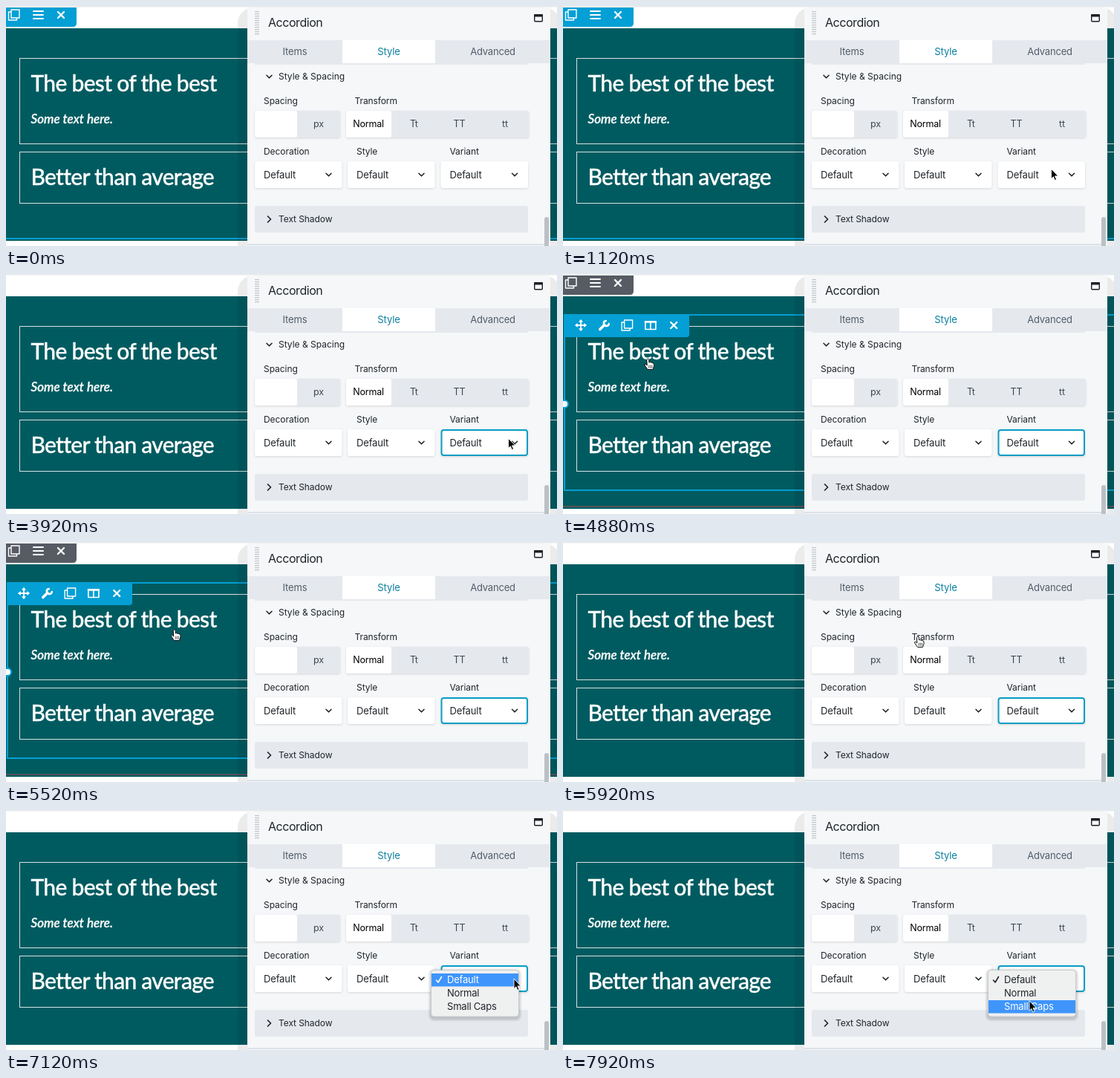
Animation of 742x323 px, one loop 8000 ms. Source, as an HTML page:

```html
<!DOCTYPE html>
<html lang="en">
<head>
<meta charset="utf-8">
<title>Accordion settings</title>
<style>
html, body { margin: 0; width: 100%; height: 100%; overflow: hidden; background: #fff; }
svg { display: block; width: 742px; height: 323px; }
text { font: 12px Inter, "Open Sans", sans-serif; fill: #1f2429; white-space: pre; }
.title { font: 500 30px Lato, sans-serif; fill: #fff; stroke: #fff; stroke-width: .35px; }
.body { font: italic 500 17px Lato, sans-serif; fill: #fff; stroke: #fff; stroke-width: .4px; }
.mid { text-anchor: middle; }
.line { fill: none; stroke-linecap: round; stroke-linejoin: round; }
.field { filter: drop-shadow(0 1px 1.5px rgba(0, 0, 0, .13)); }
</style>
</head>
<body>
<svg id="stage" viewBox="0 0 742 323" xmlns="http://www.w3.org/2000/svg"></svg>
<script>
const NS = "http://www.w3.org/2000/svg";
const stage = document.getElementById("stage");
const LOOP = 8000, STEP = 80;
const BLUE = "#049fd4", TEAL = "#005b60", GREY = "#e5e9ee", INK = "#1f2429";
const TAB = "#525c69", UNIT = "#3d4650";

function add(parent, tag, attrs, content) {
  const el = document.createElementNS(NS, tag);
  for (const k in attrs) el.setAttribute(k, attrs[k]);
  if (content) el.textContent = content;
  parent.appendChild(el);
  return el;
}
const group = (parent, attrs) => add(parent, "g", attrs);
const rect = (p, x, y, width, height, fill, more) =>
  add(p, "rect", { x, y, width, height, fill, ...more });
const path = (p, d, stroke, width, more) =>
  add(p, "path", { d, stroke, "stroke-width": width, class: "line", ...more });
const label = (p, x, y, str, size, spacing) =>
  add(p, "text", { x, y, style: `font-size:${size}px;letter-spacing:${spacing}px` }, str);
const mid = (p, x, y, str, size, spacing, fill) =>
  add(p, "text", { x, y, class: "mid", style: `font-size:${size}px;letter-spacing:${spacing}px;fill:${fill}` }, str);
const show = (el, on) => el.setAttribute("display", on ? "inline" : "none");

// Toolbar icons, each centred on x, y
const icons = {
  copy(p, x, y) {
    path(p, `M${x - 4} ${y - 7}h11v11h-11z M${x - 4} ${y - 4}h-3.5v11h11v-3`, "#fff", 1.4);
  },
  menu(p, x, y) {
    path(p, `M${x - 6} ${y - 5}h13 M${x - 6} ${y}h13 M${x - 6} ${y + 5}h13`, "#fff", 2);
  },
  close(p, x, y) {
    path(p, `M${x - 4} ${y - 4}l8 8m0 -8l-8 8`, "#fff", 2.4);
  },
  move(p, x, y) {
    path(p, `M${x - 6} ${y}h12M${x} ${y - 6}v12`, "#fff", 1.8);
    path(p, `M${x - 2} ${y - 5}l2 -2.5 2 2.5zM${x - 2} ${y + 5}l2 2.5 2 -2.5zM${x - 5} ${y - 2}l-2.5 2 2.5 2zM${x + 5} ${y - 2}l2.5 2 -2.5 2z`, "#fff", 1, { style: "fill:#fff" });
  },
  wrench(p, x, y) {
    path(p, `M${x - 5.5} ${y + 5.5}l6 -6`, "#fff", 3.6);
    path(p, `M${x + 2.5} ${y - 6}a3.5 3.5 0 1 0 4 4`, "#fff", 2.6);
  },
  columns(p, x, y) {
    path(p, `M${x - 7} ${y - 5}h14v10.5h-14zM${x} ${y - 5}v10`, "#fff", 1.7);
    path(p, `M${x - 7} ${y - 4.5}h14`, "#fff", 2.6);
  }
};

function rowBar(color, line) {
  const g = group(stage);
  path(g, "M0 2H95V23Q95 28 90 28H0Z", "none", 0, { style: `fill:${color}` });
  icons.copy(g, 11, 12);
  icons.menu(g, 43, 12);
  icons.close(g, 74, 12);
  rect(g, 0, 312, 742, 2, line);
  return g;
}

// Page
rect(stage, 0, 0, 742, 323, "#fff");
rect(stage, 0, 0, 742, 1.5, "#e6e8ea");
rect(stage, 0, 30, 742, 286, TEAL);
for (const [y, h] of [[70.5, 115], [196.5, 69]])
  rect(stage, 18.5, y, 760, h, "none", { stroke: "#d4e3e4", "stroke-width": 1 });
const copy = (cls, x, y, str, gap) =>
  add(stage, "text", { class: cls, x, y, style: `letter-spacing:${gap}px` }, str);
copy("title", 33.5, 115, "The best of the best", -.7);
copy("body", 33.5, 158, "Some text here.", .05);
copy("title", 33.5, 241, "Better than average", -.72);

const rowOn = rowBar(BLUE, BLUE);
const rowDim = rowBar("#565b64", "#59535c");
const module = group(stage);
rect(module, 2, 55, 760, 236, "none", { stroke: BLUE, "stroke-width": 2 });
path(module, "M1 54H170V81Q170 85 166 85H1Z", "none", 0, { style: `fill:${BLUE}` });
["move", "wrench", "copy", "columns", "close"].forEach((n, i) => icons[n](module, 24 + i * 31.3, 69));
add(module, "circle", { cx: 2, cy: 175, r: 5, fill: "#fff", stroke: BLUE, "stroke-width": 2 });

// Panel on its translucent rim
rect(stage, 312, 1.5, 434, 345, "#000", { rx: 22, opacity: .08 });
rect(stage, 325, 1.5, 408, 322, "#f5f7f9");
for (let y = 7; y < 38; y += 3) rect(stage, 335, y, 6, 1.3, "#c3c6ca");
label(stage, 353, 28, "Accordion", 16, -.45);
rect(stage, 711.7, 11.7, 10.6, 9, "none", { stroke: "#1d2125", "stroke-width": 1.4, rx: 1 });
rect(stage, 711, 11, 12, 3.5, "#1d2125", { rx: 1 });
rect(stage, 325, 46, 408, 31, GREY);
rect(stage, 453, 46, 125, 31, "#fff");
mid(stage, 389, 66, "Items", 13, -.1, TAB);
mid(stage, 515.5, 66, "Style", 13, -.1, "#0a7ea0");
mid(stage, 655.5, 66, "Advanced", 13, -.2, TAB);
rect(stage, 335, 77, 368, 2, GREY);

const down = (x, y) => path(stage, `M${x - 3.5} ${y - 1.7}l3.5 3.5 3.5 -3.5`, INK, 1.6);
down(354.5, 95);
label(stage, 367, 99, "Style & Spacing", 12, 0);
label(stage, 347, 132, "Spacing", 12, -.05);
label(stage, 469.5, 132, "Transform", 12, -.1);

function field(x, y, w, split) {
  const g = group(stage, { class: "field" });
  rect(g, x, y, w, 36, split ? GREY : "#fff", { rx: 3 });
  if (split) rect(g, x, y, split, 36, "#fff", { rx: 3 });
}
field(335, 141, 115, 57);
field(458, 141, 246, 61);
mid(stage, 488, 163, "Normal", 12.5, -.2, "#000");
[["px", 421], ["Tt", 549.5], ["TT", 610.5], ["tt", 672]].forEach(([s, x]) =>
  mid(stage, x, 163, s, 12.5, 0, UNIT));

[["Decoration", 335], ["Style", 460], ["Variant", 585.5]].forEach(([name, x]) => {
  label(stage, x + 12, 200, name, 12, -.05);
  field(x, 209, 117.5);
  label(stage, x + 12, 231.5, "Default", 13, -.15);
  down(x + 99.5, 227);
});
const ring = rect(stage, 586.5, 210, 115.5, 34, "none", { rx: 3, stroke: "#0a9cc4", "stroke-width": 2 });

rect(stage, 335, 269, 368, 36, GREY, { rx: 3 });
path(stage, "M352.5 283l4 4 -4 4", INK, 1.7);
label(stage, 367, 291, "Text Shadow", 12, -.08);
rect(stage, 325, 320, 400, 2, "#dbe1e9");
rect(stage, 725, 284, 6, 50, "#bcc0c5", { rx: 3 });

// Drop-down list
const menu = group(stage);
for (let i = 4; i > 0; i--)
  rect(menu, 572.5 - i, 217 - i, 118 + 2 * i, 62 + 2 * i + 1.5, "#000", { rx: 4 + i, opacity: .045 });
rect(menu, 572.5, 215.5, 118, 62.5, "#eff0f0", { rx: 4, stroke: "#c3c5c7", "stroke-width": .8 });
const bar = rect(menu, 573, 256, 117, 17.5, "#3f95fb");
const items = ["Default", "Normal", "Small Caps"].map((s, i) =>
  label(menu, 594, 233 + i * 18, s, 13, -.2));
const tick = path(menu, "M579.5 229l2.5 3 4.5 -7.5", INK, 1.6);

// Pointers
const arrow = group(stage);
path(arrow, "M0 0V13L2.900 10.300 4.800 15 7 14 5 9.400H9Z", "#fff", .9, { style: "fill:#000" });
const hand = group(stage);
path(hand, "M-1.5 1.5Q0 -1 1.3 1.5V5.5Q3 4.3 3.8 5.8Q5.5 4.9 6.2 6.5Q8 6 8 8.2V10.5L6.5 15H-.5L-4.3 9.5Q-5 7.5 -3.3 7.7L-1.5 9.3Z", "#111", 1,
  { style: "fill:#fff" });
path(hand, "M1.3 9.5v3.5M3.4 9.5v3.5M5.4 9.5v3.5", "#111", .7);

// Pointer stops: time, x, y
const stops = [
  [320, 727, 280], [1120, 657.5, 219.5], [1280, 629, 218], [1440, 629, 218], [1520, 630, 219],
  [1600, 630, 219], [1840, 630, 220], [2080, 630, 220], [2320, 680, 229], [2480, 680, 229],
  [2640, 685, 229], [3840, 685, 229], [3920, 676.5, 221.5], [4720, 122, 117], [4800, 122, 117],
  [4880, 114.5, 113.5], [5680, 240, 118], [5760, 310, 120], [5920, 478, 126.5],
  [6080, 580, 165], [6400, 688, 218], [6560, 686, 226], [6720, 684, 227.5],
  [7440, 684, 227.5], [7920, 628, 257], [8000, 628, 257]
];

function pointer(t) {
  let i = 1;
  while (i < stops.length - 1 && stops[i][0] < t) i++;
  const [t0, x0, y0] = stops[i - 1], [t1, x1, y1] = stops[i];
  let k = Math.max(0, Math.min(1, (t - t0) / (t1 - t0)));
  if (t1 - t0 > 400) k = k * k * (3 - 2 * k);
  return [x0 + (x1 - x0) * k, y0 + (y1 - y0) * k];
}

function draw(now) {
  const t = Math.floor((now % LOOP) / STEP) * STEP;
  const [x, y] = pointer(t);
  const hover = t > 3920 && t < 5760 && x < 325;
  const point = hover || (t >= 5760 && t < 6000);
  const open = (t >= 2880 && t < 3920) || t >= 6960;

  show(rowOn, t < 2960);
  show(rowDim, hover);
  show(module, hover);
  show(ring, t >= 2880);

  show(menu, open);
  const pick = Math.max(0, Math.min(2, Math.floor((y - 219.5) / 18)));
  bar.setAttribute("y", 220 + pick * 18);
  items.forEach((el, i) => { el.style.fill = i === pick ? "#fff" : INK; });
  tick.setAttribute("stroke", pick === 0 ? "#fff" : INK);

  show(arrow, t >= 320 && !point);
  show(hand, point);
  const at = `translate(${x} ${y})`;
  arrow.setAttribute("transform", at);
  hand.setAttribute("transform", at);
}

const start = performance.now();
function tickFrame() {
  draw(performance.now() - start);
  requestAnimationFrame(tickFrame);
}
tickFrame();
</script>
</body>
</html>
```
